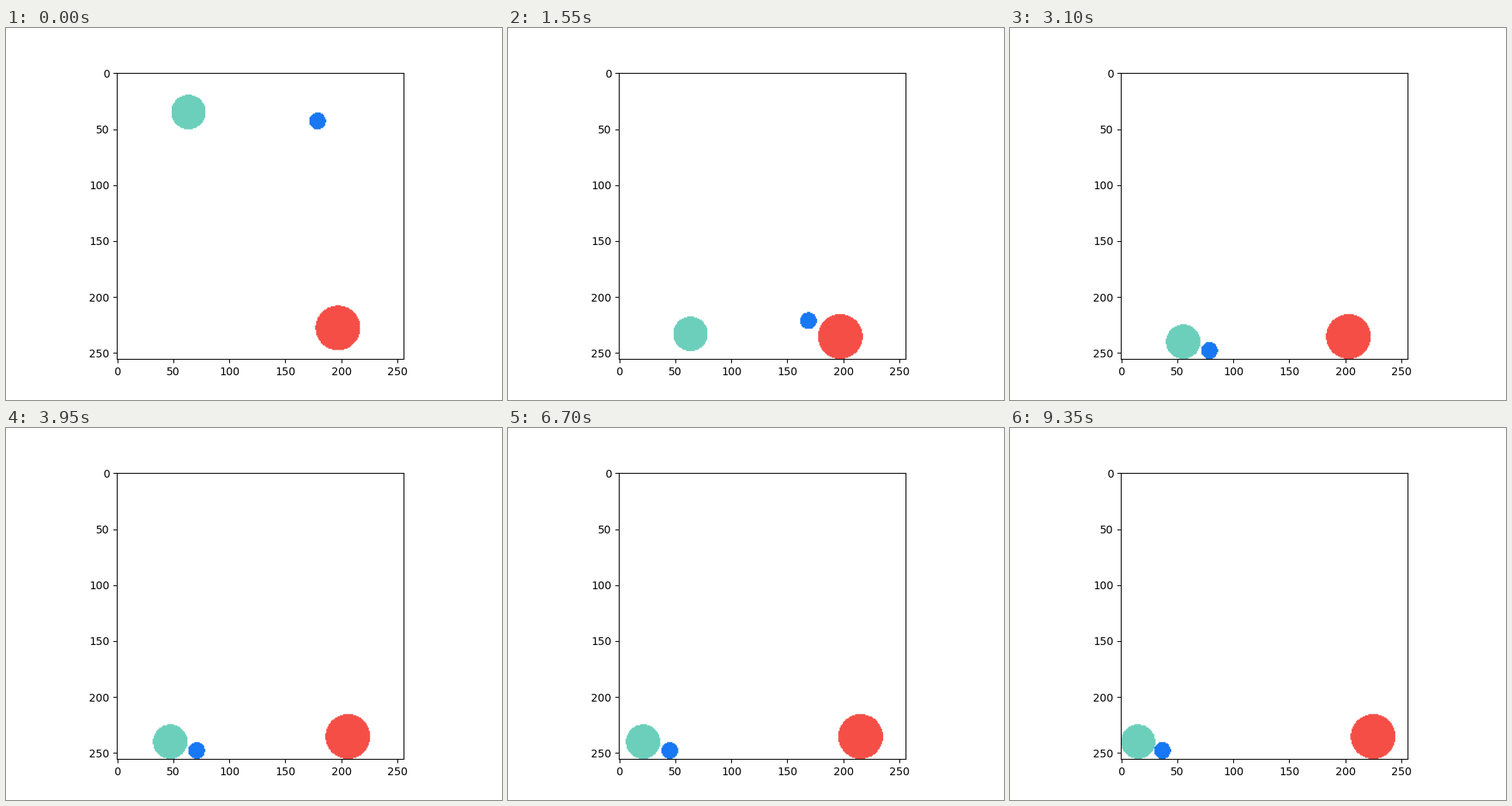
Recreate the animation shown at these times as a matplotlib script. Size 640x480 px, loop 9400 ms.

```python
import math

import numpy as np
import matplotlib.pyplot as plt
from matplotlib.animation import FuncAnimation

SIZE = 256
FRAMES = 188
G = 0.206            # half the gravity, px per frame squared
HIT_RED = 29.0       # small ball glances off the big one
HIT_TEAL = 47.75     # small ball pushes the medium one

# radius, colour
TEAL = (15.4, (107, 207, 187))
BLUE = (7.5, (24, 119, 242))
RED = (20.0, (244, 78, 71))

yy, xx = np.mgrid[0:SIZE, 0:SIZE] + 0.5


def fall(y0, n, radius):
    return min(y0 + G * n * n, SIZE - radius)


def teal_pos(n):
    m = max(0.0, n - HIT_TEAL)
    x = 64 - 0.473 * m - 1.56 * (1 - math.exp(-m / 3))
    return max(x, TEAL[0]), fall(35.6, n, TEAL[0])


def blue_pos(n):
    if n <= HIT_RED:
        return 179.2, fall(43.6, n, BLUE[0])
    m = n - HIT_RED
    y = 43.6 + G * HIT_RED ** 2 + 2.07 * m + G * m * m
    if n <= HIT_TEAL:
        x = 179.2 - 4.98 * m
    else:
        x = max(85.8 - 0.467 * (n - HIT_TEAL), 37.1)
    return x, min(y, SIZE - BLUE[0])


def red_pos(n):
    return 197.4 + 0.176 * max(0.0, n - HIT_RED), fall(228.3, n, RED[0])


BALLS = ((TEAL, teal_pos), (BLUE, blue_pos), (RED, red_pos))


def render(n):
    img = np.full((SIZE, SIZE, 3), 255, np.uint8)
    for (radius, colour), pos in BALLS:
        x, y = pos(n)
        img[(xx - x) ** 2 + (yy - y) ** 2 < radius ** 2] = colour
    return img


fig, ax = plt.subplots(figsize=(6.4, 4.8), dpi=100)
picture = ax.imshow(render(0))


def update(n):
    picture.set_data(render(n))
    return (picture,)


anim = FuncAnimation(fig, update, frames=FRAMES, interval=50,
                     repeat=True, repeat_delay=0)
plt.show()
```
